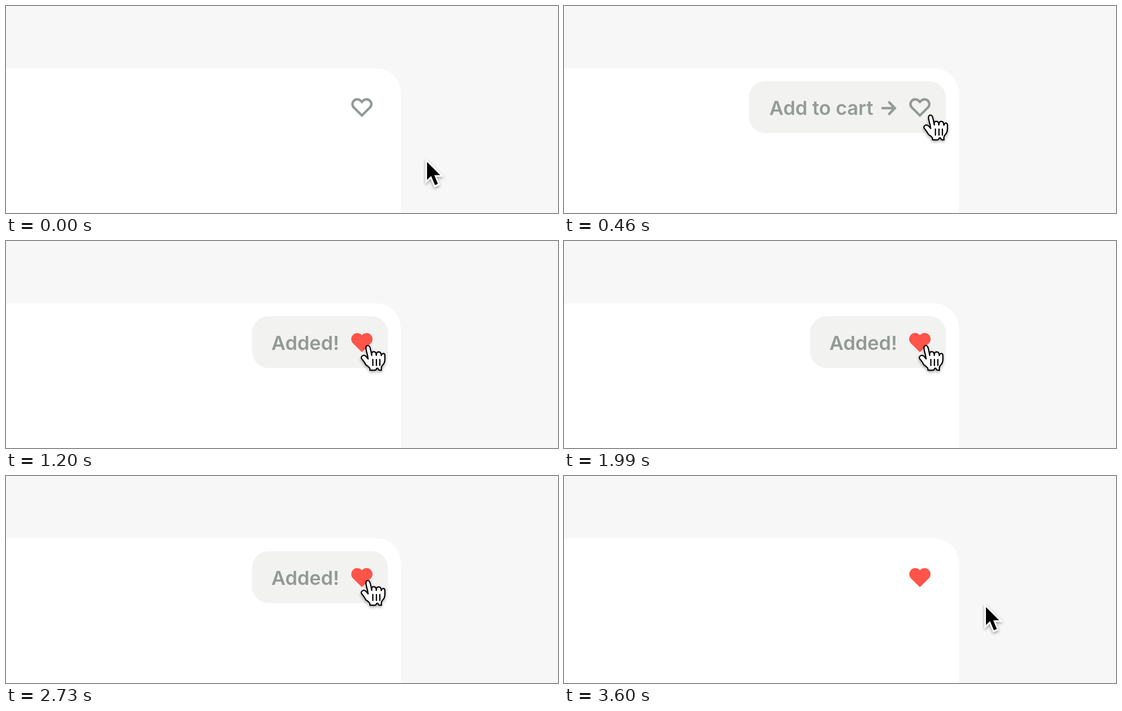
Recreate the animation shown at these times as an HTML page. Size 1223 px wide and 458 px high, loop 3.7 s.

```html
<!DOCTYPE html>
<html lang="en">
<head>
<meta charset="utf-8">
<title>Add to cart</title>
<style>
  html, body { margin: 0; height: 100%; overflow: hidden; background: #f7f7f7; }
  svg { display: block; width: 100vw; height: 100vh; }
  text {
    font: 600 43px Inter, sans-serif;
    font-optical-sizing: none;
    fill: #929a95;
  }
  .line { fill: none; stroke: #929a95; stroke-width: 5.4; }
  #liked { fill: #ff5449; stroke: #ff5449; stroke-width: 5.4; }
  #heart { transform-origin: 788.5px 229px; }
  #arrow, #hand { filter: drop-shadow(0 3px 3px rgba(0, 0, 0, .36)); }
</style>
</head>
<body>
<svg viewBox="0 0 1223 458">
  <defs>
    <path id="shape" d="M788.5 212.3L785.1 208.9A10.65 10.65 0 0 0 770.1 223.9L788.5 242.3L806.9 223.9A10.65 10.65 0 0 0 791.9 208.9Z"/>
  </defs>

  <rect x="-100" y="138" width="974.5" height="500" rx="54" fill="#fff"/>

  <g id="panel">
    <rect id="pill" y="166.5" height="114.5" rx="36" fill="#f2f2f1"/>
    <g id="offer">
      <text x="455" y="241">Add to cart</text>
      <path class="line" d="M703.5 226H732M719 211.5L733 226L719 240.5"/>
    </g>
    <text id="done" x="588" y="241">Added!</text>
  </g>

  <g id="heart">
    <use id="plain" href="#shape" class="line"/>
    <use id="liked" href="#shape"/>
  </g>

  <g id="cursor">
    <g id="arrow">
      <g transform="translate(-30.4 -22) scale(3.56)">
        <path fill="#fff" d="M8.2 20.9V4.9L19.8 16.5H13L12.6 16.6ZM17.3 21.6L13.7 23.1L9 12L12.7 10.5Z"/>
        <rect x="12.5" y="13.6" width="2" height="8" transform="matrix(.9221 -.3871 .3871 .9221 -5.7605 6.5909)"/>
        <path d="M9.2 7.3V18.5L12.2 15.6L12.6 15.5H17.4Z"/>
      </g>
    </g>
    <g id="hand">
      <g transform="translate(-43.5 -30) scale(3.6)" fill="#fff" stroke="#000" stroke-width=".75" stroke-linejoin="round" stroke-linecap="round">
        <path d="M11.3 20.4L10.1 18.4L8.6 16.5Q8.2 15.9 8.6 15.2Q9.8 13.7 11.3 15.1L12.6 16.6L12.2 14.4L11.6 12L11.3 10.5Q11.1 8.4 12.4 8.4Q13.4 8.4 13.8 9.8L14.3 11.8L14.8 14.5V13.1Q15 12.2 16 12.2Q17.6 12.2 17.6 14.5L17.9 12.9Q18.2 12.3 19.1 12.3Q20.3 12.4 20.5 13.5L20.7 14.6L21 13.9Q21.5 13.2 22.1 13.3Q22.9 13.5 22.9 14.5V16.8Q22.9 18.6 22 19.9Q20.9 21.1 20.8 21.7Q20.6 22.6 20.8 23.6H19.6Q19 23.4 18.6 22.5Q18.3 22.1 17.9 22.5Q17.3 23.6 16.8 23.6H13.7Q13.8 22.5 13.5 22.2L12.4 21.1Z"/>
        <path fill="none" d="M15.5 17V20.7M17.7 17V20.7M19.8 17V20.7"/>
      </g>
    </g>
  </g>
</svg>

<script>
const LOOP = 3700, FPS = 15;
const el = id => document.getElementById(id);
const [panel, pill, offer, done, heart, plain, liked, cursor, arrow, hand] =
  ['panel', 'pill', 'offer', 'done', 'heart', 'plain', 'liked', 'cursor', 'arrow', 'hand'].map(el);

const ramp = (t, from, to) => Math.min(1, Math.max(0, (t - from) / (to - from)));
const mix = (a, b, p) => a + (b - a) * p;
const ease = (u, power) => Math.sin(u * Math.PI / 2) ** power;
const show = (node, on) => node.setAttribute('opacity', on);

function pointer(t) {
  if (t < 1000) {
    const u = ramp(t, 0, 600);
    return [mix(930.5, 800.5, ease(u, 1.3)), mix(341, 231, ease(u, 1.55))];
  }
  const u = ramp(t, 3080, 3600);
  return [mix(800.5, 932.5, ease(u, 1.6)), mix(231, 286, ease(u, 1.4))];
}

function beat(t) {
  const phase = (t - 1967) / 383;
  return phase > 0 && phase < 2 ? 1 + .125 * Math.sin(Math.PI * phase) ** 2 : 1;
}

function draw(t) {
  const [x, y] = pointer(t);
  const over = x < 846 && y < 281;
  cursor.setAttribute('transform', `translate(${x} ${y})`);
  show(arrow, over ? 0 : 1);
  show(hand, over ? 1 : 0);

  const added = ramp(t, 1100, 1167);
  const left = mix(409.5, 545.5, added);
  pill.setAttribute('x', left);
  pill.setAttribute('width', 846 - left);
  show(panel, ramp(t, 320, 470) * (1 - ramp(t, 3220, 3370)));
  show(offer, 1 - added);
  show(done, added);

  show(plain, 1 - added);
  show(liked, added);
  heart.style.transform = `scale(${beat(t)})`;
}

// Motion is sampled at a fixed rate, like a screen capture.
function tick() {
  const t = performance.now() % LOOP;
  draw(Math.floor((t + 11) * FPS / 1000) * 1000 / FPS);
  requestAnimationFrame(tick);
}
tick();
</script>
</body>
</html>
```
